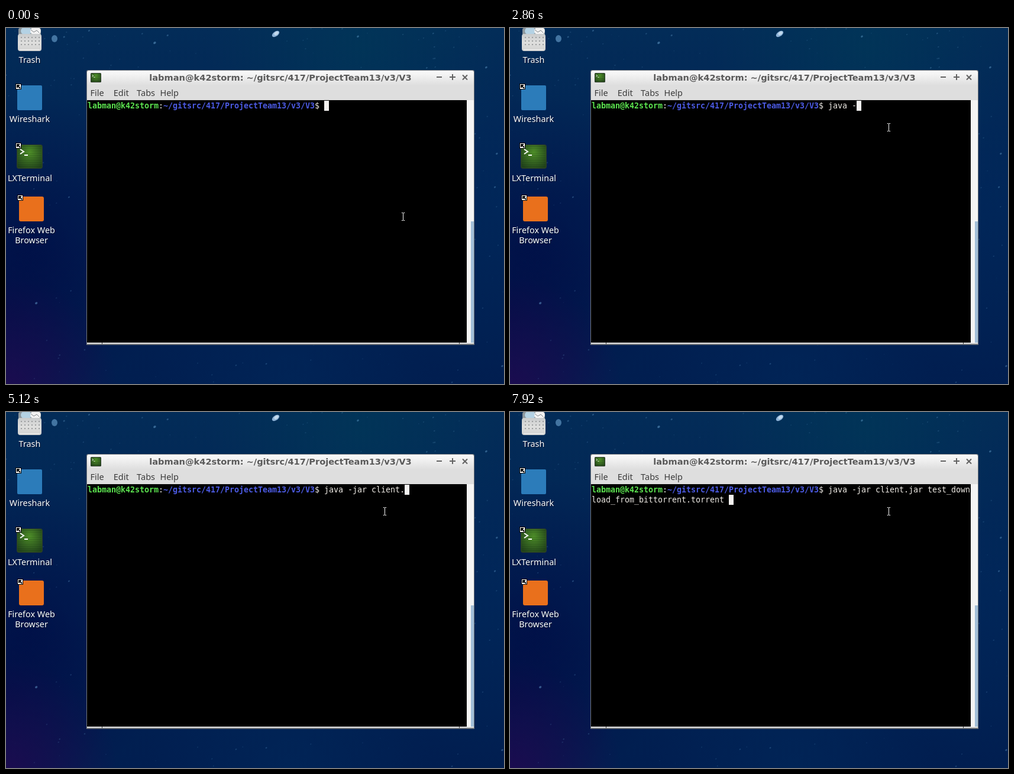
Recreate the animation shown at these times as an HTML page with a canvas. Size 842 by 602 pixels, loop 8000 ms.

```html
<!DOCTYPE html>
<html lang="en">
<head>
<meta charset="utf-8">
<title>Terminal session</title>
<style>
html, body { margin: 0; width: 100%; height: 100%; overflow: hidden; background: #011f4e; }
canvas { display: block; }
</style>
</head>
<body>
<canvas id="stage" width="842" height="602"></canvas>
<script>
const W = 842, H = 602, LOOP = 8000;
const CELL = 8, ROW = 17, COLS = 80, LEFT = 138, TOP = 123;
const MONO = '"DejaVu Sans Mono", monospace';
const SANS = '"Noto Sans", "Open Sans", sans-serif';
const USER = 'labman@k42storm';
const DIR = '~/gitsrc/417/ProjectTeam13/v3/V3';
const PLAIN = '#eeeae4';

// Typing bursts: text, time of first key, time of last key (ms).
// The file name is completed at once.
const BURSTS = [
  ['jav', 1240, 1470], ['a ', 1930, 2310], ['-', 2860, 2860], ['jar ', 3410, 3790],
  ['client', 4190, 4570], ['.', 5120, 5120], ['jar ', 5440, 5590],
  ['te', 6530, 6600], ['st', 7000, 7460],
  ['_download_from_bittorrent.torrent ', 7920, 7920]
];

const stage = document.getElementById('stage').getContext('2d');
const back = document.createElement('canvas');
back.width = W;
back.height = H;
const bg = back.getContext('2d');

function box(g, x, y, w, h, fill) {
  g.fillStyle = fill;
  g.fillRect(x, y, w, h);
}

function roundBox(x, y, w, h, r, fill) {
  bg.fillStyle = fill;
  bg.beginPath();
  bg.roundRect(x, y, w, h, r);
  bg.fill();
}

function oval(x, y, rx, ry, fill, tilt = 0) {
  bg.fillStyle = fill;
  bg.beginPath();
  bg.ellipse(x, y, rx, ry, tilt, 0, 7);
  bg.fill();
}

function line(color, width, ...points) {
  bg.strokeStyle = color;
  bg.lineWidth = width;
  bg.beginPath();
  for (const p of points) bg.lineTo(...p);
  bg.stroke();
}

function vertical(y0, y1, ...colors) {
  const grad = bg.createLinearGradient(0, y0, 0, y1);
  colors.forEach((c, i) => grad.addColorStop(i / (colors.length - 1), c));
  return grad;
}

function glow(x, y, r, rgb, alpha) {
  const grad = bg.createRadialGradient(x, y, 0, x, y, r);
  grad.addColorStop(0, `rgba(${rgb},${alpha})`);
  grad.addColorStop(1, `rgba(${rgb},0)`);
  box(bg, 0, 0, W, H, grad);
}

function drawSky() {
  box(bg, 0, 0, W, H, vertical(0, H, '#032c58', '#012253', '#011e50'));
  glow(600, 30, 260, '0,58,88', 0.6);
  glow(842, 300, 300, '0,44,96', 0.45);
  glow(40, 370, 260, '0,10,68', 0.6);
  glow(0, 480, 180, '2,8,66', 0.5);
  glow(0, 610, 190, '34,8,80', 0.8);
  glow(480, 600, 240, '0,42,92', 0.5);

  let seed = 17;
  const rand = () => (seed = seed * 16807 % 2147483647) / 2147483647;
  // Stars gather towards the top; a few are large and bright.
  for (let i = 0; i < 260; i++) {
    const x = rand() * W, y = H * rand() ** 1.4;
    const size = rand(), r = 0.6 + size + size ** 20;
    oval(x, y, r, r * 0.75, `rgba(110,170,215,${0.06 + 0.16 * size + 0.3 * size ** 12})`, -0.6);
  }
  oval(82, 18, 5, 6, 'rgba(110,165,210,0.6)');
  oval(456, 10, 7, 4, '#8fb4d8', -0.6);
  oval(457, 9, 4, 2.5, '#c3daee', -0.6);
}

function label(text, x, y) {
  bg.font = `14.4px ${SANS}`;
  bg.textAlign = 'center';
  bg.fillStyle = '#00102c';
  bg.fillText(text, x + 1, y + 1);
  bg.fillStyle = '#fff';
  bg.fillText(text, x, y);
}

function linkBadge(x, y) {
  box(bg, x, y, 10, 10, '#000');
  box(bg, x + 1, y + 1, 8, 8, '#fff');
  box(bg, x + 2, y + 2, 5, 2, '#000');
  box(bg, x + 2, y + 2, 2, 5, '#000');
  line('#000', 2, [x + 3, y + 3], [x + 8, y + 8]);
}

function drawTrash() {
  roundBox(21, 0, 38, 14, 3, '#8d979d');
  oval(34, 5, 9, 7, '#b4d2e4');
  oval(50, 5, 9, 7, '#f2f2f2');
  line('#7f8487', 1, [42, 3], [47, 7], [52, 4], [56, 8]);
  roundBox(20, 10, 40, 29, 4, vertical(10, 39, '#c9cbcc', '#dededd', '#d2d2d1'));
  for (let y = 15; y < 33; y += 6)
    for (let x = 25; x < 57; x += 6) box(bg, x, y, 2, 2, '#9b9d9e');
  box(bg, 23, 36, 34, 1, '#f4f4f4');
}

function terminalIcon(x, y, w, h) {
  const small = w < 30, k = small ? 0.4 : 1;
  roundBox(x, y, w, h, 4 * k, '#2b3a2a');
  const grad = bg.createRadialGradient(x + w / 2, y + h * 0.3, 1, x + w / 2, y + h * 0.4, w * 0.62);
  grad.addColorStop(0, '#51932a');
  grad.addColorStop(1, '#23451b');
  roundBox(x + 1, y + 1, w - 2, h - 2, 3 * k, grad);
  for (let i = y + 3; i < y + h - 2; i += 3) box(bg, x + 2, i, w - 4, 1, 'rgba(10,30,8,0.25)');
  line('#fff', 2 * k, [x + 6 * k, y + 8 * k], [x + 12 * k, y + 12 * k], [x + 6 * k, y + 16 * k]);
  box(bg, x + 13 * k, y + 17 * k, 6 * k, 2 * k, '#fff');
}

function drawDesktop() {
  drawTrash();
  label('Trash', 40, 59);

  roundBox(19, 97, 42, 42, 2, '#2c7cba');
  linkBadge(16, 94);
  label('Wireshark', 40, 159);

  terminalIcon(18, 197, 44, 41);
  linkBadge(16, 194);
  label('LXTerminal', 40.5, 259);

  roundBox(22, 285, 42, 42, 3, '#e9701c');
  linkBadge(19, 282);
  label('Firefox Web', 43, 347);
  label('Browser', 43, 364);
}

function drawWindow() {
  roundBox(136, 71, 656, 465, [3, 3, 0, 0], '#74787d');
  roundBox(137, 72, 654, 50, [3, 3, 0, 0], vertical(72, 122, '#fbfbfb', '#dedede', '#dedede'));

  terminalIcon(143, 76, 18, 16);
  bg.font = 'bold 14.6px "DejaVu Sans", sans-serif';
  bg.textAlign = 'center';
  bg.fillStyle = '#5a5a5a';
  bg.fillText(`${USER}: ${DIR}`, 464, 89);

  const ink = '#626262';
  box(bg, 728, 82, 9, 2, ink);
  box(bg, 750, 82, 10, 2, ink);
  box(bg, 754, 78, 2, 10, ink);
  line(ink, 2, [772, 79.5], [780, 87.5]);
  line(ink, 2, [780, 79.5], [772, 87.5]);

  bg.font = `14.5px ${SANS}`;
  bg.textAlign = 'left';
  bg.fillStyle = '#3c3c3c';
  ['File', 'Edit', 'Tabs', 'Help'].forEach((name, i) => bg.fillText(name, 142.5 + i * 39.3, 115));

  box(bg, 137, 122, 642, 410, '#000');
  box(bg, 779, 122, 12, 410, '#f4f4f4');
  box(bg, 786, 327, 5, 205, '#a3bfd8');
  box(bg, 137, 532, 654, 2, '#e4e4e4');
  for (const x of [162, 766]) box(bg, x, 532, 1, 3, '#444');
}

const cellX = i => LEFT + i % COLS * CELL;
const cellY = i => TOP + Math.floor(i / COLS) * ROW;

// Writes on the character grid and returns the next free cell.
function print(g, text, cell, color, weight = '') {
  g.font = `${weight} 13.33px ${MONO}`;
  g.textAlign = 'left';
  g.fillStyle = color;
  for (const ch of text) {
    g.fillText(ch, cellX(cell), cellY(cell) + 13);
    cell++;
  }
  return cell;
}

function drawPrompt() {
  let cell = print(bg, USER, 0, '#5be24f', 'bold');
  cell = print(bg, ':', cell, PLAIN);
  cell = print(bg, DIR, cell, '#4c5be4', 'bold');
  return print(bg, '$ ', cell, PLAIN);
}

// Keys are evenly spaced inside each burst.
function typedAt(t) {
  return BURSTS.map(([text, first, last]) => {
    if (t < first) return '';
    if (t >= last) return text;
    return text.slice(0, 1 + Math.floor((t - first) / (last - first) * (text.length - 1)));
  }).join('');
}

const bend = (a, b, c, s) => a * (1 - s) ** 2 + 2 * b * s * (1 - s) + c * s * s;

// The pointer sweeps up along a curve in four jumps.
function drawPointer(t) {
  const s = Math.min(4, Math.floor((t + 5) / 75)) / 4;
  const x = Math.round(bend(671, 600, 640, s)), y = Math.round(bend(319, 119, 168, s));
  box(stage, x, y - 6, 1, 12, '#fff');
  for (const end of [y - 7, y + 6]) {
    box(stage, x - 2, end, 2, 1, '#fff');
    box(stage, x + 1, end, 2, 1, '#fff');
  }
}

drawSky();
drawDesktop();
drawWindow();
const start = drawPrompt();

function draw() {
  const t = performance.now() % LOOP;
  stage.drawImage(back, 0, 0);
  const cursor = print(stage, typedAt(t), start, PLAIN);
  box(stage, cellX(cursor), cellY(cursor), CELL, ROW, '#f4f2f0');
  drawPointer(t);
  requestAnimationFrame(draw);
}
draw();
</script>
</body>
</html>
```
